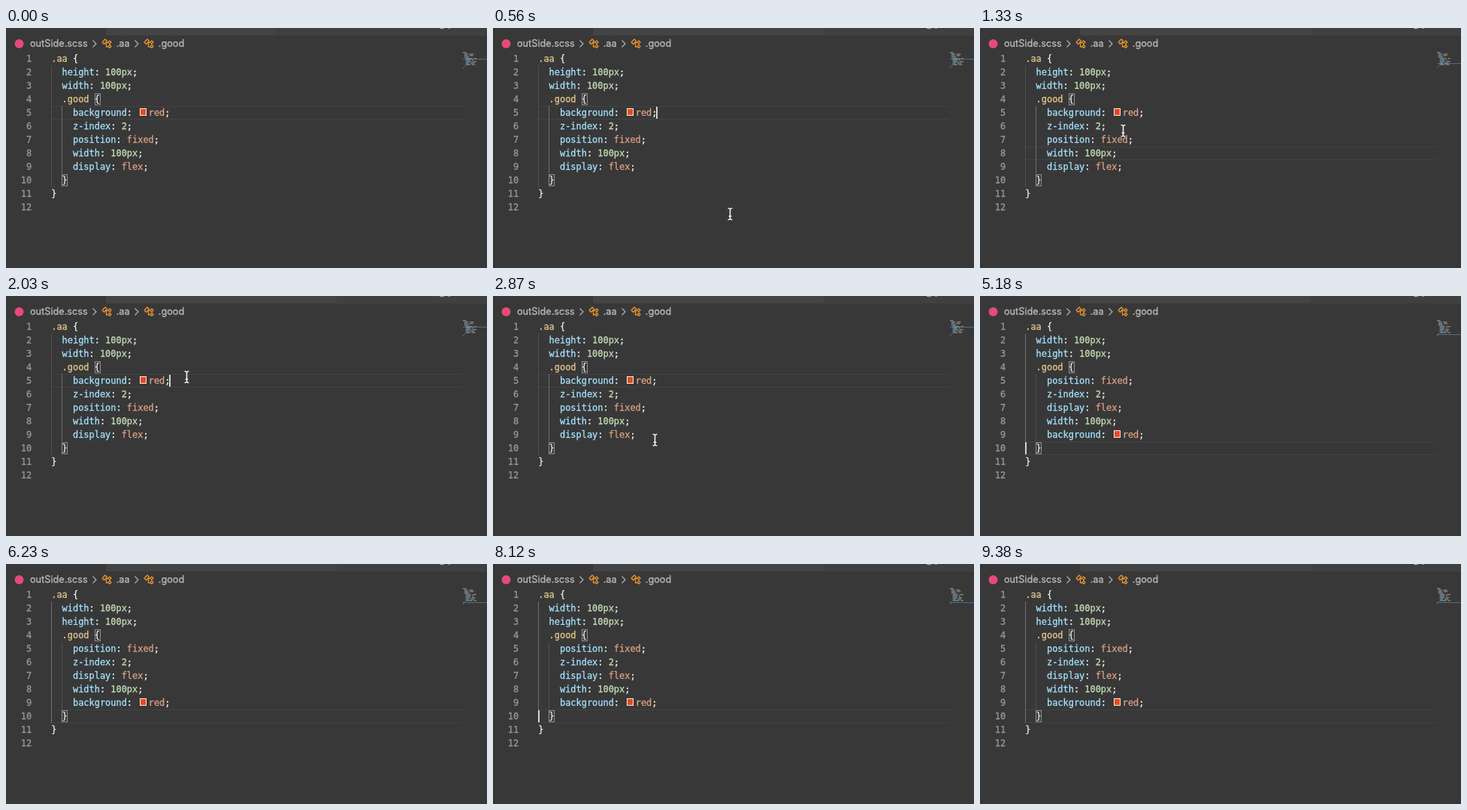
Write an HTML page with a canvas that moves like this. It is 640 by 320 pixels and loops after 9.45 s.

```html
<!DOCTYPE html>
<html lang="en">
<head>
<meta charset="utf-8">
<title>Sorting style properties</title>
<style>
html, body { margin: 0; width: 100%; height: 100%; overflow: hidden; background: #383838; }
canvas { display: block; }
</style>
</head>
<body>
<canvas id="stage" width="640" height="320"></canvas>
<script>
const ctx = document.getElementById('stage').getContext('2d');
const LOOP = 9450, SORT = 4700;
const MONO = '11.95px "DejaVu Sans Mono", monospace';
const UI = '12.7px Inter, sans-serif';
const CHAR = 7.19, LEFT = 60.2;
const COLORS = { selector: '#e2c88c', property: '#a4e2ff', number: '#c3dcb4', value: '#dda184', plain: '#ececec' };

const sheet = (outer, inner) => ['.aa {', ...outer.map(s => '  ' + s), '  .good {',
  ...inner.map(s => '    ' + s), '  }', '}', ''];
const before = sheet(['height: 100px;', 'width: 100px;'],
  ['background: red;', 'z-index: 2;', 'position: fixed;', 'width: 100px;', 'display: flex;']);
const after = sheet(['width: 100px;', 'height: 100px;'],
  ['position: fixed;', 'z-index: 2;', 'display: flex;', 'width: 100px;', 'background: red;']);

// Caret placements: start time, line, column
const carets = [[-700, 5, 20], [800, 8, 17], [2000, 5, 20], [SORT, 10, 0]];
// Pointer stops: time, x, y
const path = [[280, 325, 264], [480, 325, 264], [780, 268, 173], [950, 268, 173], [1330, 190, 137],
  [1850, 240, 108], [2100, 240, 108], [2600, 215, 192], [SORT, 215, 192]];

function rect(x, y, w, h, color) {
  ctx.fillStyle = color;
  ctx.fillRect(x, y, w, h);
}

// A thin outline gives the slightly heavier look of smoothed screen text
function text(s, x, y, color, font = MONO) {
  ctx.font = font;
  ctx.fillStyle = ctx.strokeStyle = color;
  ctx.lineWidth = 0.3;
  ctx.fillText(s, x, y);
  ctx.strokeText(s, x, y);
}

function line(points, color, width = 1) {
  ctx.strokeStyle = color;
  ctx.lineWidth = width;
  ctx.beginPath();
  points.forEach(([x, y]) => ctx.lineTo(x, y));
  ctx.stroke();
}

function classIcon(x) {
  const c = '#e8942e';
  line([[x + 1, 19], [x + 5, 15], [x + 7.5, 17.5], [x + 3.5, 21.5], [x + 1, 19]], c, 1.4);
  line([[x + 6, 19.5], [x + 9, 19.5]], c, 1.3);
  line([[x + 6.5, 19.5], [x + 6.5, 25], [x + 9, 25]], c, 1.3);
  for (const y of [19, 24.5]) {
    line([[x + 9, y], [x + 11, y - 2], [x + 13, y], [x + 11, y + 2], [x + 9, y]], c, 1.3);
  }
}

function header(t) {
  const split = t < 70 ? 357 : 440;
  rect(133, 0, split - 133, 10, '#444444');
  rect(split, 0, 640 - split, 10, '#404040');
  line([[577, 0], [580, 1], [583, 0]], '#c0c0c0');
  rect(588, 0, 3, 1, '#909090');
  ctx.fillStyle = '#e84a78';
  ctx.beginPath();
  ctx.arc(17.5, 21, 6, 0, 7);
  ctx.fill();
  const labels = '#b8b8b8';
  text('outSide.scss', 32, 25.3, labels, UI);
  text('.aa', 146.7, 25.3, labels, UI);
  text('.good', 202.8, 25.3, labels, UI);
  for (const x of [115.5, 171.5]) line([[x, 16.5], [x + 4.5, 21], [x, 25.5]], labels, 1.1);
  classIcon(127);
  classIcon(183);
}

function codeLine(s, y) {
  let x = LEFT + s.search(/\S|$/) * CHAR;
  const put = (part, color) => {
    text(part, x, y, color);
    x += part.length * CHAR;
  };
  const code = s.trim();
  const rule = code.match(/^(.+?)(: )(.+)(;)$/);
  if (!rule) {
    const brace = code.search(/[{}]/);
    put(code.slice(0, brace), COLORS.selector);
    put(code.slice(brace), COLORS.plain);
    return;
  }
  put(rule[1], COLORS.property);
  put(rule[2], COLORS.plain);
  if (rule[3] === 'red') {
    rect(178, y - 10, 9, 10, '#eeeeee');
    rect(179, y - 9, 7, 8, '#e84a1c');
    x = 189.7;
  }
  put(rule[3], /\d/.test(rule[3]) ? COLORS.number : COLORS.value);
  put(rule[4], COLORS.plain);
}

function minimap(lines, active) {
  rect(608, 31 + active * 2, 32, 1, '#46708c');
  lines.forEach((s, i) => {
    const indent = s.search(/\S|$/), y = 32 + i * 2;
    const colon = s.indexOf(':');
    const end = colon < 0 ? s.length : colon;
    rect(608 + indent * 0.9, y, (end - indent) * 0.9, 1.4, colon < 0 ? '#8c8472' : '#6c8c9c');
    if (colon > 0) rect(608 + (colon + 2) * 0.9, y, (s.length - colon - 2) * 0.9, 1.4, '#88806f');
  });
}

function editor(t) {
  const lines = t < SORT ? before : after;
  const [start, row, col] = carets.filter(c => c[0] <= t).pop();
  const top = 14 + row * 18;
  rect(60, top, 547, 1, '#434343');
  rect(60, top + 17, 547, 1, '#434343');
  const outer = row === 10;
  rect(60, 50, 1, 162, outer ? '#707070' : '#505050');
  rect(74, 104, 1, 90, outer ? '#505050' : '#707070');
  for (const [x, y] of [[118, 87], [74, 195]]) {
    rect(x, y, 8, 16, '#909090');
    rect(x + 1, y + 1, 6, 14, '#383838');
  }
  lines.forEach((s, i) => {
    const y = 45 + i * 18;
    ctx.textAlign = 'right';
    text(i + 1, 34.2, y, '#989898');
    ctx.textAlign = 'left';
    codeLine(s, y);
  });
  if ((t - start) % 1000 < 500) {
    const x = row === 5 ? 217 : LEFT + col * CHAR;
    rect(Math.round(x), top + 1, 2, 16, '#d4d4d4');
  }
  minimap(lines, row);
}

function pointer(t) {
  const i = path.findIndex(p => p[0] > t);
  if (i < 1) return;
  const [a, b] = [path[i - 1], path[i]];
  const k = (t - a[0]) / (b[0] - a[0]);
  const e = k * k * (3 - 2 * k);
  ctx.save();
  ctx.translate(Math.round(a[1] + (b[1] - a[1]) * e) + 0.5, Math.round(a[2] + (b[2] - a[2]) * e));
  for (const [color, width] of [['#202020', 3], ['#f4f4f4', 1.4]]) {
    line([[-3, -7.5], [-1, -7.5], [0, -6], [0, 6], [-1, 7.5], [-3, 7.5]], color, width);
    line([[3, -7.5], [1, -7.5], [0, -6], [0, 6], [1, 7.5], [3, 7.5]], color, width);
    line([[-2, 3], [2, 3]], color, width);
  }
  ctx.restore();
}

function draw(now) {
  const t = Math.floor((now % LOOP) / 70) * 70;
  rect(0, 0, 640, 320, '#383838');
  header(t);
  editor(t);
  pointer(t);
  requestAnimationFrame(draw);
}
draw(0);
</script>
</body>
</html>
```
